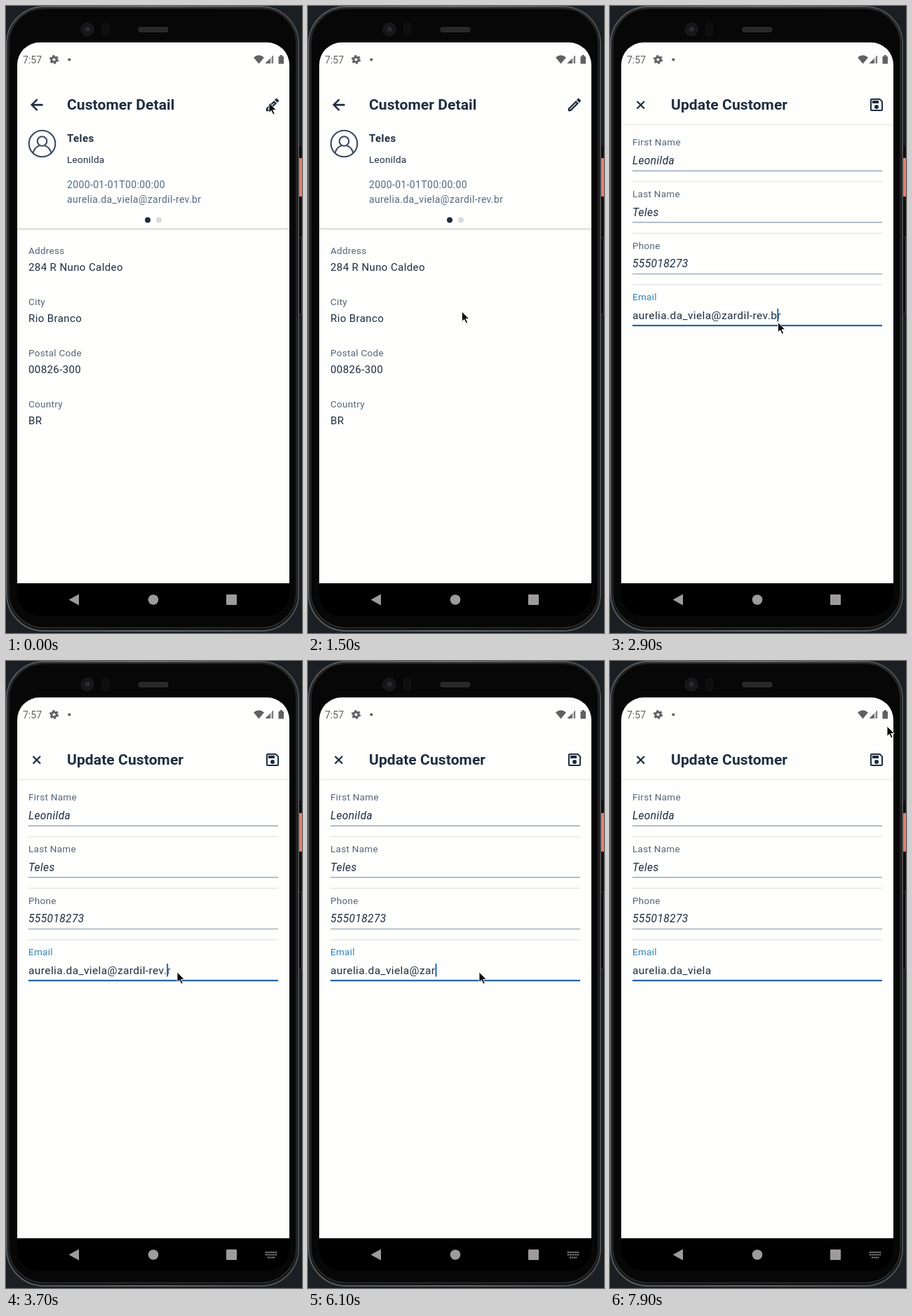
Write an HTML page that moves like this. It is 422 by 895 pixels and loops after 8000 ms.

```html
<!DOCTYPE html>
<html lang="en">
<head>
<meta charset="utf-8">
<title>Customer form</title>
<style>
html, body { margin: 0; width: 100%; height: 100%; overflow: hidden; background: #1b1f23; }
svg { display: block; width: 422px; height: 895px; }
text { font-family: Roboto, "Open Sans", sans-serif; fill: #1d2d3e; white-space: pre; }
.title { font-size: 21px; font-weight: 700; letter-spacing: .1px; }
.name { font-size: 15px; font-weight: 700; letter-spacing: .4px; }
.sub { font-size: 13.5px; letter-spacing: .3px; }
.info { font-size: 14px; letter-spacing: .36px; fill: #556b82; }
.label { font-size: 13.5px; letter-spacing: .28px; fill: #556575; }
.value { font-size: 15px; letter-spacing: .4px; }
.input { font-size: 15.5px; letter-spacing: .4px; font-style: italic; }
.clock { font-size: 14px; fill: #5f6164; }
.focus .label { fill: #2a82ba; }
.focus .input { font-style: normal; }
.focus .line { stroke: #2565a3; stroke-width: 2.2; }
.line { stroke: #8799ab; stroke-width: 1.2; }
.rule { stroke: #dadde2; stroke-width: 1; }
.icon { fill: #1d2d3e; }
</style>
</head>
<body>
<svg viewBox="0 0 422 895">
  <defs>
    <linearGradient id="rim">
      <stop offset="0" stop-color="#55585a"/><stop offset=".5" stop-color="#6a6a6c"/><stop offset="1" stop-color="#4a4c4e"/>
    </linearGradient>
    <linearGradient id="shade" x2="0" y2="1">
      <stop offset="0" stop-color="#000" stop-opacity=".16"/><stop offset="1" stop-color="#000" stop-opacity="0"/>
    </linearGradient>
    <clipPath id="face"><circle cx="51.5" cy="196.5" r="19"/></clipPath>
  </defs>

  <!-- phone -->
  <rect x="417" y="200" width="4" height="130" fill="#0c0c0d"/>
  <rect x="417.5" y="217" width="6" height="55" rx="1.5" fill="#e5806a"/>
  <rect x="417.5" y="330" width="4" height="110" rx="1" fill="#090909" stroke="#444"/>
  <rect x="1" y="1" width="416" height="891" rx="53" fill="#111213" stroke="url(#rim)" stroke-width="2"/>
  <rect x="4" y="3.5" width="410" height="884" rx="50" fill="#080708" stroke="#2c2d2e" stroke-width="1.5"/>
  <circle cx="116" cy="33.5" r="9" fill="#151618" stroke="#202123"/>
  <circle cx="116" cy="33.5" r="4" fill="#222427"/>
  <circle cx="117" cy="32.5" r="1.3" fill="#44474b"/>
  <rect x="137" y="25" width="9" height="17" rx="4" fill="#0d0d0e" stroke="#191919"/>
  <rect x="189" y="30.5" width="42" height="6.5" rx="2.5" fill="#272728" stroke="#343435"/>
  <rect x="16" y="52" width="388" height="819" rx="32"/>
  <path d="M16 824V84a32 32 0 0 1 32-32H372a32 32 0 0 1 32 32V824z" fill="#fefefd"/>

  <!-- status bar -->
  <text class="clock" x="24" y="81.5">7:57</text>
  <g fill="#5f6164">
    <circle cx="68.5" cy="76.5" r="3.6" fill="none" stroke="#5f6164" stroke-width="3"/>
    <circle cx="68.5" cy="76.5" r="5.6" fill="none" stroke="#5f6164" stroke-width="2" stroke-dasharray="2.9 2.964"/>
    <circle cx="90.3" cy="76.5" r="2.1"/>
    <path d="M353 73.5Q360.5 67 368 73.5L360.5 82.5z"/>
    <path d="M381 70.5V82H369.5z" opacity=".35"/>
    <path d="M376.5 75V82H369.5zM381 70.5V82H379.5V72z"/>
    <path d="M388.5 72H390.5V70H394V72H396V82.500H388.500z"/>
  </g>

  <!-- detail page -->
  <g id="detail">
    <path class="icon" d="M20 11H7.830l5.590-5.590L12 4l-8 8 8 8 1.410-1.410L7.830 13H20z" transform="translate(31 128.400) scale(1.060)" stroke="#1d2d3e" stroke-width=".5"/>
    <text class="title" x="87" y="148">Customer Detail</text>
    <path class="icon" transform="translate(368 129)" stroke="#1d2d3e" stroke-width=".4" d="M14.060 9.020l.92.92L5.920 19H5v-.92l9.060-9.060M17.660 3c-.25 0-.51.1-.7.29l-1.830 1.830 3.750 3.750 1.830-1.830c.39-.39.39-1.020 0-1.410l-2.340-2.340c-.2-.2-.45-.29-.71-.29zm-3.600 3.190L3 17.250V21h3.750L17.810 9.940z"/>
    <g fill="none" stroke="#3a4a60" stroke-width="2.1">
      <circle cx="51.5" cy="196.500" r="18.800"/>
      <circle cx="51.500" cy="193" r="6.800"/>
      <path clip-path="url(#face)" d="M38.500 212C39 204 44 200.500 47.500 199.500M55.500 199.500C59 200.500 64 204 64.500 212"/>
    </g>
    <text class="name" x="87" y="193.500">Teles</text>
    <text class="sub" x="87" y="224">Leonilda</text>
    <text class="info" x="87" y="260">2000-01-01T00:00:00</text>
    <text class="info" x="87" y="280.500">aurelia.da_viela@zardil-rev.br</text>
    <circle cx="202" cy="305.500" r="4" fill="#1d2d3e"/>
    <circle cx="218" cy="305.500" r="4" fill="#d9dadc"/>
    <rect x="16" y="317" width="388" height="4" fill="url(#shade)"/>
    <g id="facts"></g>
  </g>

  <!-- form page -->
  <g id="form">
    <path d="M38.500 136l10.500 10.500M49 136L38.500 146.500" stroke="#1d2d3e" stroke-width="2.200"/>
    <text class="title" x="87" y="148">Update Customer</text>
    <path class="icon" fill-rule="evenodd" transform="translate(368 129)" d="M17 3H5a2 2 0 0 0-2 2v14a2 2 0 0 0 2 2h14a2 2 0 0 0 2-2V7zM19 19H5V5h11.200L19 7.800zM12 12a3 3 0 1 0 0 6 3 3 0 0 0 0-6zM6 6h9v4H6z"/>
    <rect x="16" y="168.500" width="388" height="2.500" fill="url(#shade)" opacity=".6"/>
    <g id="fields"></g>
    <rect id="caret" y="432" width="2" height="18.500" fill="#1d6ba8"/>
  </g>

  <!-- navigation bar -->
  <g fill="#9e9b9c">
    <path d="M89.500 847.500L104 839.500V855.500z"/>
    <circle cx="210" cy="847.500" r="7.300"/>
    <rect x="314" y="840" width="15" height="15" rx="1"/>
    <path id="keys" d="M370 844H386M370 847.500H386M373 851.500H383" stroke="#9e9b9c" stroke-width="1.800" stroke-dasharray="1.800 1"/>
  </g>

  <path id="pointer" d="M0 0V14.500L3.300 11.400L5.800 17L8.200 15.900L5.700 10.500H10.300z" fill="#0a0a0a" stroke="#fff" stroke-width=".9"/>
</svg>
<script>
const $ = id => document.getElementById(id);
const mail = 'aurelia.da_viela@zardil-rev.br';

$('facts').innerHTML = [
  ['Address', '284 R Nuno Caldeo'], ['City', 'Rio Branco'],
  ['Postal Code', '00826-300'], ['Country', 'BR']
].map(([label, value], i) => `<g transform="translate(32 ${353.5 + 73 * i})">
  <text class="label">${label}</text><text class="value" y="24.500">${value}</text></g>`).join('');

$('fields').innerHTML = [
  ['First Name', 'Leonilda'], ['Last Name', 'Teles'], ['Phone', '555018273'], ['Email', mail]
].map(([label, value], i) => `<g transform="translate(32 ${199.3 + 73.6 * i})">
  <text class="label">${label}</text><text class="input" y="26.700">${value}</text>
  <path class="line" d="M0 36H356"/>${i < 3 ? '<path class="rule" d="M0 51.400H356"/>' : ''}</g>`).join('');

const email = $('fields').lastElementChild;
const input = email.querySelector('.input');

// time, kept characters, rest of the text, caret behind the rest
const edits = [
  [0, 28, 'br', 0], [3100, 29, 'r', 0], [3500, 28, 'r', 0], [3900, 27, 'r', 0],
  [4100, 26, 'r', 0], [4300, 25, 'r', 0], [4500, 24, 'r', 1], [5100, 23, 'r', 1],
  [5500, 23, '', 0], [5700, 22, '', 0], [5900, 21, '', 0], [6100, 20, '', 0],
  [6300, 19, '', 0], [6500, 18, '', 0], [6900, 17, '', 0], [7300, 16, '', 0]
];
// time, x, y
const path = [
  [0, 375, 138], [300, 375, 138], [500, 318, 330], [700, 228, 551], [900, 213, 432],
  [1100, 213, 432], [2100, 229, 442], [2700, 237, 455], [3300, 244, 444],
  [7300, 244, 444], [7500, 264, 412], [7700, 335, 250], [7900, 395, 93], [8000, 395, 93]
];

function place(t) {
  const i = path.findIndex(p => p[0] > t);
  const [a, b] = [path[i - 1], path[i]];
  const k = (t - a[0]) / (b[0] - a[0]);
  return [1, 2].map(n => a[n] + (b[n] - a[n]) * k);
}
const show = (id, on) => $(id).style.visibility = on ? 'visible' : 'hidden';

function draw(now) {
  const time = now % 8000;
  const t = Math.max(0, Math.floor((time - 100) / 200) * 200 + 100);
  const focus = t >= 2900;

  show('detail', t < 1700);
  show('form', t >= 1700);
  show('keys', t >= 3500);
  show('caret', focus && t < 7900);
  email.setAttribute('class', focus ? 'focus' : '');

  const [, kept, rest, behind] = edits.findLast(e => e[0] <= t);
  const head = t < 3100 ? mail.slice(0, 29) : mail.slice(0, kept);
  const tail = t < 3100 ? 'r' : rest;
  input.textContent = behind ? head + tail : head;
  $('caret').setAttribute('x', 32 + input.getComputedTextLength());
  input.textContent = head + tail;

  $('pointer').setAttribute('transform', `translate(${place(t)})`);
  requestAnimationFrame(draw);
}
requestAnimationFrame(draw);
</script>
</body>
</html>
```
